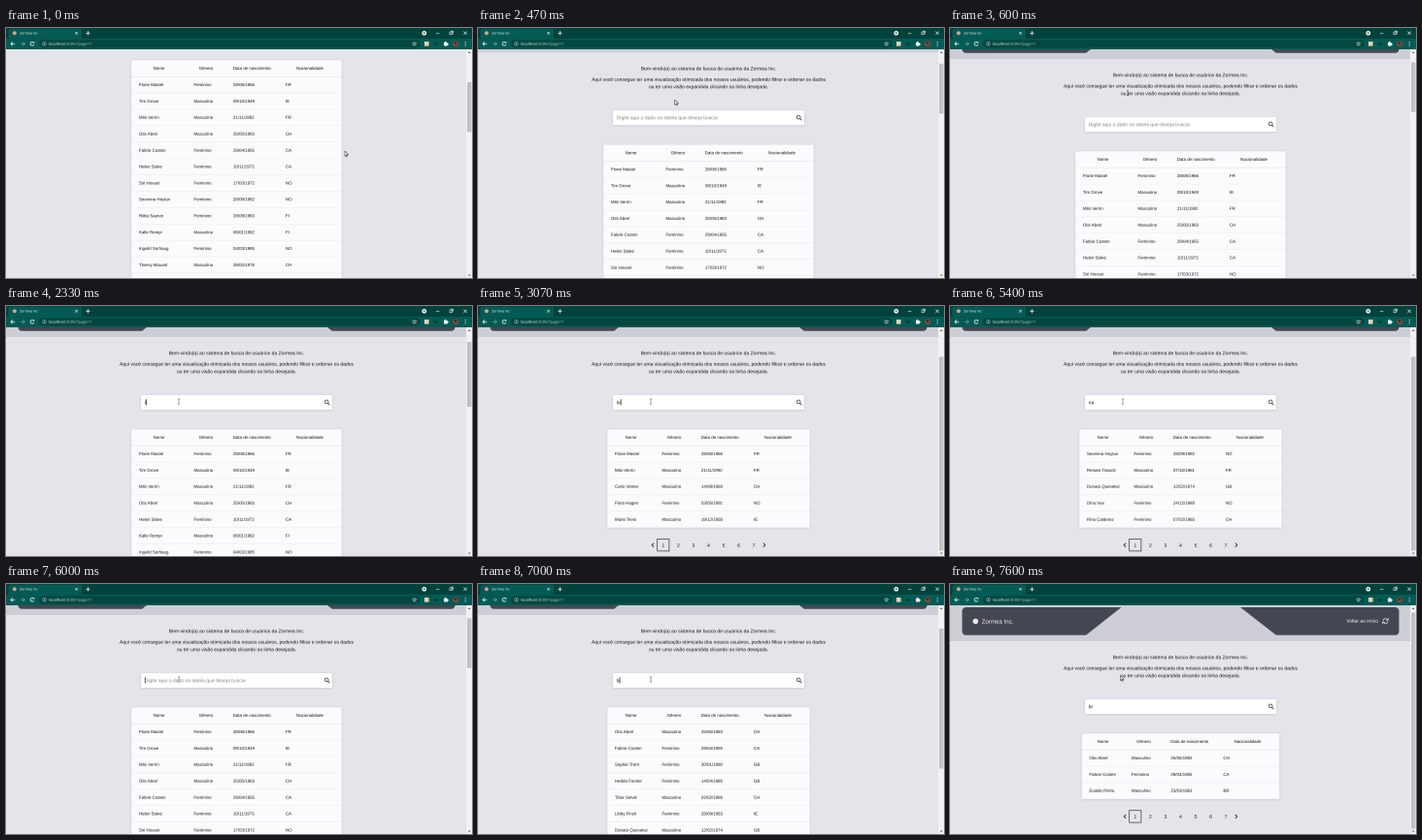
Animation, 480 px wide and 258 px high, one loop 8 s. Source, as an HTML page with a canvas:

```html
<!DOCTYPE html>
<html lang="pt-BR">
<head>
<meta charset="utf-8">
<title>Zormea Inc</title>
<style>
html, body { margin: 0; width: 100%; height: 100%; overflow: hidden; background: #e4e5ea; }
canvas { display: block; width: 480px; height: 258px; }
</style>
</head>
<body>
<canvas id="stage"></canvas>
<script>
const W = 480, H = 258, LOOP = 8000, TOP = 22, ROW = 16.9, MID = 237.5;
const SANS = '"Liberation Sans", Arial, sans-serif';
const UI = '"Open Sans", "Noto Sans", sans-serif';
const INK = '#17171b', LIGHT = '#e6f1ef', TAB = '#01423d', BAR = '#045a54';

// Everything is drawn large, then reduced for evenly spaced small text.
const SCALE = 4;
const dpr = window.devicePixelRatio || 1;
const stage = document.getElementById('stage');
stage.width = W * dpr;
stage.height = H * dpr;
const screen2d = stage.getContext('2d');
const large = document.createElement('canvas');
large.width = W * SCALE;
large.height = H * SCALE;
const c = large.getContext('2d');

const people = `Florie Mastel,F,28/06/1966,FR
Tim Grove,M,09/10/1949,IE
Milo Verrin,M,21/11/1992,FR
Otis Abrel,M,25/05/1983,CH
Fabrie Costen,F,29/04/1955,CA
Helen Stoke,F,10/11/1973,CA
Siri Hovset,F,17/03/1972,NO
Severina Hoytun,F,28/09/1982,NO
Riitta Saarvo,F,28/09/1983,FI
Kalle Rompi,M,06/01/1982,FI
Ingvild Sorhaug,F,04/03/1985,NO
Thierry Mouvet,M,28/02/1978,CH
Carlo Venter,M,14/08/1969,CH
Flora Hagen,F,03/05/1991,NO
Marlo Tevis,M,19/12/1958,IE
Renato Tissard,M,07/10/1961,FR
Sophie Trent,F,20/01/1990,GB
Hedda Forster,F,14/04/1985,GB
Tibor Selvik,M,02/02/1966,CH
Libby Finch,F,28/09/1963,IE
Donato Quevelez,M,12/02/1974,GB
Dina Vue,F,24/12/1989,NO
Rina Calderez,F,07/02/1965,CH
Evaldo Pinho,M,23/03/1963,BR`.split('\n').map(line => {
  const [name, sex, born, land] = line.split(',');
  return [name, sex === 'F' ? 'Feminino' : 'Masculino', born, land];
});
const headings = ['Nome', 'Gênero', 'Data de nascimento', 'Nacionalidade'];

// rows found and width of the name column
const found = q => ({
  count: { l: 36, lo: 5, na: 5, b: 11, br: 3 }[q] || 50,
  nameWidth: q === 'br' ? 43.5 : q === 'lo' || q === 'na' || q === 'b' ? 48.5 : 56.5
});

// each entry also restarts the caret blink
const keys = [
  [1270, ''], [2330, 'l'], [2530, 'lo'], [2800, 'lo'], [3330, 'l'], [3600, ''], [4200, 'n'],
  [4470, 'na'], [4670, 'na'], [5600, 'n'], [5730, ''], [6730, ''], [6930, 'b'], [7070, 'br']
];
const JUMP = keys.at(-1)[0];

const progress = (t, from, to) => Math.max(0, Math.min(1, (t - from) / (to - from)));
const ease = p => p < .5 ? 2 * p * p : 1 - 2 * (1 - p) * (1 - p);
const lerp = (a, b, p) => a + (b - a) * p;

function inputAt(t) {
  const last = keys.findLast(k => k[0] <= t);
  return last ? { query: last[1], caret: (t - last[0]) % 1060 < 530 } : { query: '', caret: false };
}

function rect(x, y, w, h, fill) {
  c.fillStyle = fill;
  c.fillRect(x, y, w, h);
}

function round(x, y, w, h, r, fill) {
  c.fillStyle = fill;
  c.beginPath();
  c.roundRect(x, y, w, h, r);
  c.fill();
}

function dot(x, y, r, fill) {
  c.fillStyle = fill;
  c.beginPath();
  c.arc(x, y, r, 0, 7);
  c.fill();
}

function ring(x, y, r, color, width, from = 0, to = 7) {
  c.strokeStyle = color;
  c.lineWidth = width;
  c.beginPath();
  c.arc(x, y, r, from, to);
  c.stroke();
}

function box(x, y, w, h, color, width) {
  c.strokeStyle = color;
  c.lineWidth = width;
  c.strokeRect(x, y, w, h);
}

function trace(points) {
  c.beginPath();
  for (let i = 0; i < points.length; i += 2) c.lineTo(points[i], points[i + 1]);
}

function line(color, width, ...points) {
  trace(points);
  c.strokeStyle = color;
  c.lineWidth = width;
  c.stroke();
}

function poly(fill, ...points) {
  trace(points);
  c.fillStyle = fill;
  c.fill();
}

// dir -1 points left, 1 points right
const chevron = (x, y, dir, color) =>
  line(color, .8, x - dir * 2, y - 2, x, y, x - dir * 2, y + 2);

const triangle = (x, y, dir, color) =>
  poly(color, x - 1.4, y, x + 1.4, y, x, y + dir * 1.6);

function cross(x, y, r) {
  line(LIGHT, .6, x - r, y - r, x + r, y + r);
  line(LIGHT, .6, x - r, y + r, x + r, y - r);
}

// y is the middle of the letters
function text(s, x, y, size, color = INK, align = 'left', font = SANS) {
  c.font = `${size}px ${font}`;
  c.textAlign = align;
  c.fillStyle = color;
  c.fillText(s, x, y + size * .35);
  return c.measureText(s).width;
}

function card(x, y, w, h, fill) {
  c.save();
  c.shadowColor = 'rgba(40,42,60,.16)';
  c.shadowBlur = 2 * SCALE;
  c.shadowOffsetY = .5 * SCALE;
  round(x, y, w, h, 1, fill);
  c.restore();
}

function drawHeader() {
  const dark = '#444751', top = 24, bottom = 52.8;
  rect(0, TOP, 474, 37, '#cdced5');
  c.save();
  c.beginPath();
  c.roundRect(12.5, top, 450, bottom - top, 4);
  c.clip();
  poly(dark, 0, top, 176.5, top, 140, bottom, 0, bottom);
  poly(dark, 299, top, W, top, W, bottom, 336, bottom);
  c.restore();
  dot(26.3, 38.5, 2.8, '#e8e8ec');
  text('Zormea Inc.', 32.7, 38.5, 6.15, '#f2f2f4');
  text('Voltar ao início', 441, 38, 5, '#f4f4f6', 'right');
  for (const side of [-1, 1]) {
    const turn = side < 0 ? 0 : Math.PI;
    ring(448.5, 38.2, 2.5, '#f4f4f6', .7, turn + .2, turn + 2.8);
    line('#f4f4f6', .7, 448.5 + side * 2.9, 38.2 - side * 2.9,
      448.5 + side * 2.7, 38.2 - side * .9, 448.5 + side * .7, 38.2 - side);
  }
}

function drawSearch({ query, caret }) {
  card(139, 119, 197, 15, '#fff');
  if (query) text(query, 142.7, 126.6, 5);
  else text('Digite aqui o dado na tabela que deseja buscar', 142.7, 126.4, 5, '#85858b');
  if (caret) {
    c.font = `5px ${SANS}`;
    rect(142.9 + c.measureText(query).width, 123.2, .7, 6.2, '#111');
  }
  ring(330.2, 125.9, 1.9, '#333', .7);
  line('#333', .8, 331.6, 127.3, 333.4, 129.1);
}

function drawTable(query) {
  const { count, nameWidth } = found(query);
  const cells = [nameWidth, 40.5, 54, 65.5];
  const width = cells.reduce((a, b) => a + b);
  const left = MID - width / 2, top = 154.3, height = ROW * (count + 1);
  const rows = people.filter(p => p.join(' ').toLowerCase().includes(query));
  card(left, top, width, height, '#fbfbfd');
  let x = left;
  cells.forEach((w, k) => {
    text(headings[k], x + w / 2, top + 8.2, 4.4, INK, 'center');
    rows.forEach((p, i) => text(p[k], x + 7.7, top + ROW * (i + 1) + 8.3, 4.4));
    x += w;
  });
  for (let i = 1; i <= Math.min(count, rows.length); i++)
    rect(left, top + ROW * i - .3, width, .5, i === 1 ? '#dfdfe5' : '#ebebf0');
  drawPages(top + height + 18);
}

function drawPages(y) {
  box(184.7, y - 6.2, 12.2, 12.4, '#333', .7);
  for (let n = 0; n < 7; n++) text(n + 1, 190.8 + n * 15.55, y + .2, 5, INK, 'center');
  chevron(179.2, y, -1, INK);
  chevron(295.8, y, 1, INK);
}

function drawPage(input, scroll) {
  c.save();
  c.beginPath();
  c.rect(0, TOP, 474, H - TOP);
  c.clip();
  rect(0, TOP, 474, H - TOP, '#e4e5ea');
  c.translate(0, -scroll);
  drawHeader();
  const centred = (s, y) => text(s, MID, y, 5, INK, 'center');
  centred('Bem-vindo(a) ao sistema de busca de usuários da Zormea Inc.', 75.5);
  centred('Aqui você consegue ter uma visualização otimizada dos nossos usuários, podendo filtrar e ordenar os dados', 86.7);
  centred('ou ter uma visão expandida clicando na linha desejada.', 94.4);
  drawSearch(input);
  drawTable(input.query);
  c.restore();
}

function drawScrollbar(query, scroll) {
  const view = H - TOP, track = 223;
  const full = Math.max(view, 263 + ROW * (found(query).count - 5));
  rect(474, TOP, 6, view, '#f1f1f1');
  rect(475, 29.5 + track * scroll / full, 4.4, track * view / full, '#c1c1c1');
  triangle(477.2, 26, -1, '#555');
  triangle(477.2, 254.6, 1, '#555');
}

function drawTabs() {
  const y = 5.3;
  rect(0, 0, W, 11, TAB);
  round(2.5, .6, 75.5, 11, [2.5, 2.5, 0, 0], BAR);
  dot(8.8, y, 2, '#d8a48c');
  text('Zormea Inc', 14, y, 3.6, '#fff', 'left', UI);
  cross(72.6, y, 1.3);
  line(LIGHT, .8, 82.2, y, 86.6, y);
  line(LIGHT, .8, 84.4, y - 2.2, 84.4, y + 2.2);
  dot(430.8, y, 2.4, '#f4f8f7');
  triangle(430.8, y - .6, 1, TAB);
  line(LIGHT, .6, 443, y, 446.4, y);
  box(457, 4.1, 2.6, 2.6, LIGHT, .6);
  line(LIGHT, .6, 457.9, 3.2, 460.5, 3.2, 460.5, 5.8);
  cross(473.1, y, 1.7);
}

function drawToolbar() {
  const y = 16.3;
  rect(0, 11, W, 11, BAR);
  [[4.9, -1, LIGHT], [19.3, 1, '#6d9c97']].forEach(([x, dir, color]) => {
    chevron(x, y, dir, color);
    line(color, .8, x, y, x - dir * 4.3, y);
  });
  ring(27, y, 1.9, LIGHT, .8, .4, 5.5);
  poly(LIGHT, 27.6, 15.8, 29.3, 15.8, 29.3, 14);

  round(34, 12.4, 393, 8, 4, '#034740');
  ring(39.5, y, 1.8, '#b9d0cd', .5);
  rect(39.2, 15.2, .6, 2.2, '#b9d0cd');
  const host = text('localhost', 44, y, 4.05, '#fff', 'left', UI);
  text(':3000/?page=1', 44 + host, y, 4.05, '#b4cdca', 'left', UI);
  const star = [];
  for (let i = 0; i <= 10; i++) {
    const a = i * Math.PI / 5 - Math.PI / 2, r = i % 2 ? 1 : 2.2;
    star.push(420.8 + r * Math.cos(a), y + r * Math.sin(a));
  }
  line('#c5dad7', .5, ...star);

  rect(431, 14, 4.6, 4.6, '#e6d2b0');
  rect(441.5, 15, 3.4, 3, '#0a3d3a');
  round(451.1, 15, 3.6, 3.5, .5, '#fff');
  dot(452.7, 14.8, .9, '#fff');
  dot(454.9, 16.7, .9, '#fff');
  dot(463.2, y, 3, '#7a4a3a');
  dot(463.2, 15.5, 1.1, '#2b211f');
  for (const dy of [-1.8, 0, 1.8]) dot(473.2, y + dy, .55, LIGHT);
}

function drawArrow(x, y) {
  c.save();
  c.translate(x, y);
  const shape = [0, 0, 0, 5.2, 1.2, 4.1, 2, 5.9, 2.8, 5.5, 2, 3.8, 3.6, 3.7, 0, 0];
  poly('#fff', ...shape);
  line('#222', .5, ...shape);
  c.restore();
}

function drawBeam(x, y) {
  for (const end of [-2.6, 2.6]) line('#444', .5, x - 1, y + end, x + 1, y + end);
  line('#444', .5, x, y - 2.6, x, y + 2.6);
}

function drawPointer(t) {
  const rise = ease(progress(t, 70, 600)), drop = progress(t, 600, 1130);
  const x = lerp(lerp(349, 183, rise), 178, drop);
  const y = lerp(lerp(127, 67, rise), 98.5, drop);
  if (t >= JUMP) drawArrow(175.5, 94.5);
  else if (t < 540) drawArrow(x, y);
  else drawBeam(x, y);
}

function draw(t) {
  const input = inputAt(t);
  const scroll = t >= JUMP ? 0 : lerp(121, 27, ease(progress(t, 50, 570)));
  c.setTransform(SCALE, 0, 0, SCALE, 0, 0);
  c.textRendering = 'geometricPrecision';
  drawPage(input, scroll);
  drawScrollbar(input.query, scroll);
  drawTabs();
  drawToolbar();
  drawPointer(t);
  screen2d.imageSmoothingQuality = 'high';
  screen2d.drawImage(large, 0, 0, stage.width, stage.height);
}

const begin = performance.now();
function tick() {
  draw((performance.now() - begin) % LOOP);
  requestAnimationFrame(tick);
}
tick();
</script>
</body>
</html>
```
